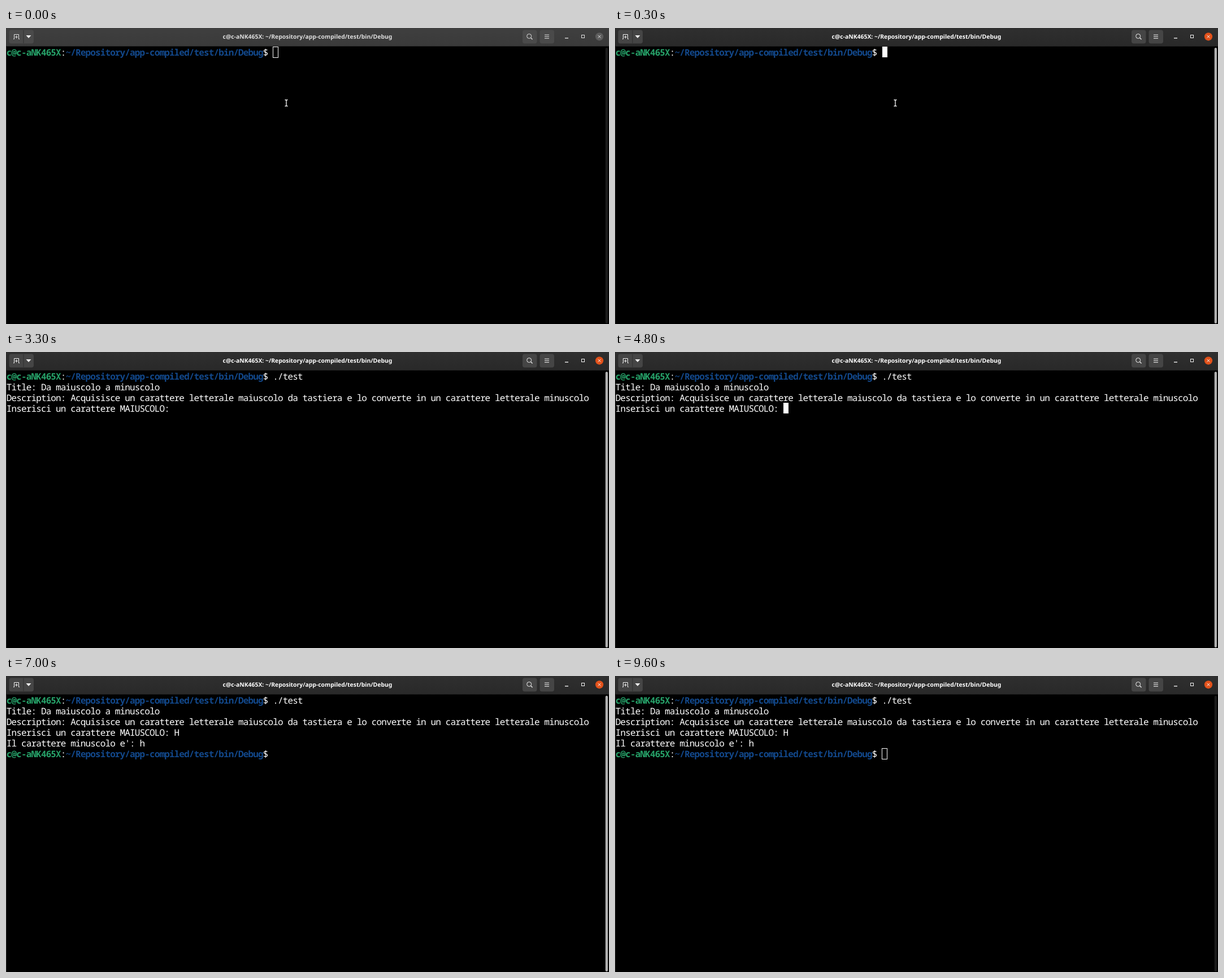
These frames come from a looping animation (1067x525 px, 9700 ms). An HTML page:

```html
<!DOCTYPE html>
<html lang="it">
<head>
<meta charset="utf-8">
<title>Terminal</title>
<style>
  html, body { margin: 0; width: 100%; height: 100%; overflow: hidden; background: #000; }
  svg { display: block; width: 1067px; height: 525px; }
  text { text-rendering: geometricPrecision; white-space: pre; }
  #title { font: 700 10.4px "Noto Sans", sans-serif; text-anchor: middle; fill: #fff; }
  #screen { font: 500 16px "Noto Sans Mono", monospace; letter-spacing: -0.87px; fill: #fff; }
  .host, .path { font-weight: 700; }
  .host { fill: #26a269; }
  .path { fill: #12488b; }
  #header { fill: url(#active); }
  .button { fill: #454545; }
  .icon { fill: none; stroke: #f2f2f2; }
  #close { fill: #e2511a; }
  #scrollbar { fill: #b2b2b2; }
  .blurred #header { fill: url(#inactive); }
  .blurred .button { fill: #4a4a4a; }
  .blurred .icon { stroke: #dedede; }
  .blurred #title { fill: #dedede; }
  .blurred #close { fill: #5c5c5c; }
  .dim #scrollbar { fill: #1c1c1c; }
</style>
</head>
<body>
<svg id="stage" viewBox="0 0 1067 525">
  <defs>
    <linearGradient id="active" x2="0" y2="1">
      <stop stop-color="#2f2f2f"/><stop offset="1" stop-color="#292929"/>
    </linearGradient>
    <linearGradient id="inactive" x2="0" y2="1">
      <stop stop-color="#3f3f3f"/><stop offset="1" stop-color="#3a3a3a"/>
    </linearGradient>
  </defs>
  <rect width="1067" height="525"/>
  <path d="M.5 33V525" stroke="#2a2a2a"/>
  <rect id="header" width="1067" height="32"/>
  <path d="M0 32.5H1067" stroke="#1b1b1b"/>

  <g class="button">
    <rect x="5.5" y="3.5" width="43.5" height="24" rx="4"/>
    <rect x="914" y="3.5" width="25.5" height="24" rx="4"/>
    <rect x="944.5" y="3.5" width="25.5" height="24" rx="4"/>
  </g>
  <path d="M31 4V27" stroke="#303030"/>
  <path d="M35.5 13H44.5L40 18Z" fill="#f2f2f2"/>
  <g class="icon">
    <path d="M13 19.5H14.5V11.5H22.5V19.5H24M18.5 13.5V18.5M16 16H21"/>
    <circle cx="925.7" cy="14.5" r="4"/>
    <path d="M928.6 17.4L931.5 20.3" stroke-width="1.3"/>
    <path d="M953 12.2H961M953 15.3H961M953 18.4H961"/>
    <path d="M989 18H995" stroke-width="1.4"/>
    <rect x="1018.5" y="12.5" width="5" height="5"/>
  </g>
  <circle id="close" cx="1050" cy="15.3" r="7.1"/>
  <path class="icon" d="M1047.5 12.8L1052.5 17.8M1052.5 12.8L1047.5 17.8"/>
  <text id="title" x="533.5" y="19"></text>

  <rect id="scrollbar" x="1060.7" y="35" width="4.3" height="489" rx="2.1"/>
  <g id="screen"></g>
  <rect id="cursor" height="19" width="9"/>
  <g id="pointer" fill="none">
    <path d="M-2.5 -5.5H-1Q0 -5.5 0 -4.5V4.5Q0 5.5 -1 5.5H-2.5M2.5 -5.5H1Q0 -5.5 0 -4.5M0 4.5Q0 5.5 1 5.5H2.5" stroke="#fff" stroke-width="1.3"/>
  </g>
</svg>
<script>
const LOOP = 9700, CELL = 8.73, ROW = 19;
const HOST = "c@c-aNK465X", PATH = "~/Repository/app-compiled/test/bin/Debug";
const PROMPT = `${HOST}:${PATH}$ `;
const INTRO = [
  "Title: Da maiuscolo a minuscolo",
  "Description: Acquisisce un carattere letterale maiuscolo da tastiera e lo converte in un carattere letterale minuscolo",
];
const QUESTION = "Inserisci un carattere MAIUSCOLO: ";

// Each cue changes part of the state from its time on.
const cues = [
  [0, { command: "", answer: "", step: "shell", cursor: "outline", pointer: [496, 133], blurred: true, dim: true }],
  [100, { cursor: "block" }],
  [300, { blurred: false, dim: false }],
  [800, { cursor: "" }],
  [1300, { command: ".", cursor: "block", pointer: null }],
  [1700, { command: "./" }],
  [2000, { command: "./test " }],
  [2400, { step: "question" }],
  [3300, { cursor: "" }],
  [3500, { cursor: "block" }],
  [4100, { cursor: "" }],
  [4800, { cursor: "block" }],
  [5500, { answer: "H" }],
  [6000, { cursor: "" }],
  [6200, { step: "done", cursor: "block" }],
  [7000, { cursor: "" }],
  [7400, { cursor: "block" }],
  [8000, { cursor: "" }],
  [8200, { pointer: [491.5, 165] }],
  [8500, { pointer: [294.5, 146] }],
  [8900, { pointer: null, cursor: "block" }],
  [9600, { cursor: "outline", dim: true }],
];

const byId = id => document.getElementById(id);
const setAttributes = (element, values) => {
  for (const [name, value] of Object.entries(values)) element.setAttribute(name, value);
};

function screenLines({ command, answer, step }) {
  const lines = [PROMPT + command];
  if (step !== "shell") lines.push(...INTRO, QUESTION + answer);
  if (step === "done") lines.push(`Il carattere minuscolo e': ${answer.toLowerCase()}`, PROMPT);
  return lines;
}

const markup = line => line
  .replace(HOST, `<tspan class="host">${HOST}</tspan>`)
  .replace(PATH, `<tspan class="path">${PATH}</tspan>`);

function draw(state) {
  const lines = screenLines(state);
  byId("screen").innerHTML = lines
    .map((line, row) => `<text x="0.8" y="${48.8 + row * ROW}">${markup(line)}</text>`)
    .join("");

  const row = lines.length - 1;
  const outlined = state.cursor === "outline";
  setAttributes(byId("cursor"), {
    x: Math.round(1.2 + lines[row].length * CELL) - (outlined ? 0.5 : 0),
    y: 33 + row * ROW + (outlined ? 0.5 : 0),
    fill: state.cursor === "block" ? "#fff" : "none",
    stroke: outlined ? "#fff" : "none",
  });

  const pointer = byId("pointer");
  pointer.style.display = state.pointer ? "" : "none";
  if (state.pointer) setAttributes(pointer, { transform: `translate(${state.pointer})` });

  byId("stage").classList.toggle("blurred", state.blurred);
  byId("stage").classList.toggle("dim", state.dim);
}

let shownCount = 0;
function tick() {
  const time = performance.now() % LOOP;
  const passed = cues.filter(([start]) => start <= time);
  if (passed.length !== shownCount) {
    shownCount = passed.length;
    draw(Object.assign({}, ...passed.map(([, change]) => change)));
  }
  requestAnimationFrame(tick);
}

byId("title").textContent = `${HOST}: ${PATH}`;
tick();
</script>
</body>
</html>
```
